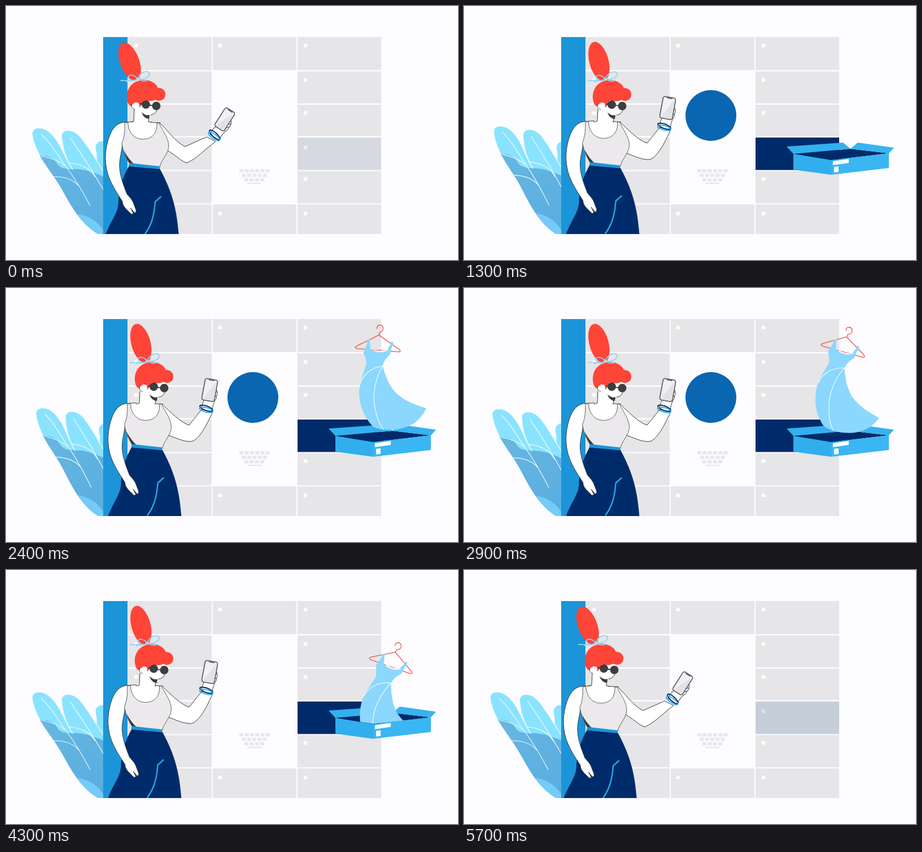
Recreate the animation shown at these times as an HTML page with a canvas. Size 800x450 px, loop 5800 ms.

```html
<!DOCTYPE html>
<html lang="en">
<head>
<meta charset="utf-8">
<title>Parcel locker</title>
<style>
html, body { margin: 0; width: 100%; height: 100%; overflow: hidden; background: #fdfcff; }
canvas { display: block; width: 800px; height: 450px; }
</style>
</head>
<body>
<canvas id="stage" width="800" height="450"></canvas>
<script>
const ctx = document.getElementById('stage').getContext('2d');
const LOOP = 5800, STEP = 100;
const PAPER = '#fdfcff', GREY = '#e6e5e7', NAVY = '#002b6b', SKY = '#27aae8',
      RED = '#ff4438', INK = '#3b3b3d', PALE = '#8bd7fe', SIDE = '#1b95d8', TINT = '#0a4f80';

const clamp = v => Math.max(0, Math.min(1, v));
const span = (t, a, b) => clamp((t - a) / (b - a));
const mix = (a, b, k) => a + (b - a) * k;
const inOut = u => u < .5 ? 4 * u ** 3 : 1 - 4 * (1 - u) ** 3;
const sine = u => (1 - Math.cos(Math.PI * u)) / 2;
const rad = d => d * Math.PI / 180;

function shape(d, fill, line, width = 1) {
  const p = d instanceof Path2D ? d : new Path2D(d);
  if (fill) { ctx.fillStyle = fill; ctx.fill(p); }
  if (line) { ctx.strokeStyle = line; ctx.lineWidth = width; ctx.stroke(p); }
}
function rect(x, y, w, h, fill) {
  ctx.fillStyle = fill;
  ctx.fillRect(x, y, w, h);
}
function oval(x, y, rx, ry, turn, fill, line, width) {
  const p = new Path2D();
  p.ellipse(x, y, rx, ry, rad(turn), 0, 7);
  shape(p, fill, line, width);
}
const dot = (x, y, r, fill) => oval(x, y, r, r, 0, fill);
function group(x, y, turn, scale, draw) {
  ctx.save();
  ctx.translate(x, y);
  ctx.rotate(rad(turn));
  ctx.scale(scale, scale);
  draw();
  ctx.restore();
}

// Plant
const leaves = [
  'M160 262C154 244 162 238 174 239L182 300L160 300Z',
  'M98 232C98 217 117 217 130 230C146 248 152 262 176 298L176 400L130 330C110 290 100 260 98 232Z',
  'M46 226C47 213 66 213 80 226C98 244 100 262 118 290C140 320 160 350 178 410L163 404C130 385 112 348 96 320C80 292 50 262 46 226Z'
].map(d => new Path2D(d));
const foliage = new Path2D();
leaves.forEach(l => foliage.addPath(l));
const darkLeaf = ctx.createLinearGradient(70, 280, 165, 380);
darkLeaf.addColorStop(0, '#66b6e0');
darkLeaf.addColorStop(1, '#5aaee0');

function plant(t) {
  const sway = Math.sin(Math.PI * span(t, 0, 3800)) ** 2;
  ctx.save();
  ctx.beginPath();
  ctx.rect(0, 0, 800, 404);
  ctx.clip();
  ctx.translate(163, 404);
  ctx.rotate(rad(2.6 * sway));
  ctx.translate(-163, -404);
  for (const l of leaves) shape(l, '#8ae3fe', PAPER, 1.2);
  ctx.clip(foliage);
  shape('M50 266C70 264 84 266 91 280C100 293 118 287 135 290C150 292 160 298 185 306L185 415L90 415Z', darkLeaf);
  shape('M112 368C140 367 165 378 178 408L106 415Z', '#74cbf5');
  shape('M62 227C82 245 91 265 106 284C122 306 136 329 149 354M62 266C84 270 96 276 104 283' +
    'M78 303C98 301 116 304 130 320M113 233C128 255 146 280 172 325M112 278C132 280 148 286 158 303' +
    'M98 226C99 244 104 268 118 290', null, '#eefaff', 1.2);
  ctx.restore();
}

// Locker wall
const COLS = [215, 366, 516], ROWS = [55, 116, 175, 233, 292.5, 351.5];
const ENDS = [113.5, 172.5, 230.5, 290.5, 349.5, 404];
const DOTS = [70, 131, 189.5, 250.5, 306.5, 367.5];

function wall(t) {
  rect(172, 55, 492, 349, PAPER);
  rect(172, 55, 43, 349, SIDE);
  const open = t < 3000 ? mix(.07, 1, span(t, 0, 250)) : Math.max(.07, (1 - span(t, 5400, 5800)) ** 1.4);
  COLS.forEach((x, c) => ROWS.forEach((y, r) => {
    if (c === 1 && r > 0 && r < 5) return;
    const h = ENDS[r] - y, w = c === 0 ? 149 : 148;
    rect(x, y, w, h, GREY);
    dot(x + (c === 1 ? 13 : c ? 14 : 15), DOTS[r], 3.5, PAPER);
    if (c === 2 && r === 3) {
      ctx.globalAlpha = open > .5 ? 1 : open;
      rect(x, y, w, h, open > .5 ? NAVY : TINT);
      ctx.globalAlpha = 1;
    }
  }));
  [[413, 289, 6], [417.5, 297, 5], [422, 305, 4]].forEach(([x, y, n]) => {
    for (let i = 0; i < n; i++) rect(x + i * 9.3, y, 7, 5.8, '#e8e7e9');
  });
  rect(427, 313, 25, 2.5, '#e8e7e9');
}

function badge(t) {
  const grow = inOut(span(t, 50, 580)), shrink = inOut(span(t, 3100, 3800));
  const r = 45 * grow * (t < 3750 ? 1 - .8 * shrink : 0);
  if (r > .5) dot(437 + 35 * shrink, 194 + 2 * shrink, r, '#0a66b0');
}

// Parcel and dress
function dress() {
  ctx.lineCap = ctx.lineJoin = 'round';
  shape('M-4 -11C-6 -17 1 -20 5 -16C9 -11 5 -6 1 -5L0 0L-37 22Q-43 26 -36 27L37 27Q43 26 37 22L0 0', null, '#ee5046', 1.3);
  shape('M-20 10L-16 9C-15 18 -13 24 -10 28C-2 31 8 31 15 28C19 22 22 15 23 9L27 12C24 20 23 27 23 32' +
    'C17 38 12 46 11 54C18 75 26 87 35 97C46 108 66 117 94 123C86 142 76 152 60 159C42 167 18 169 3 163' +
    'C-12 150 -24 132 -27 104C-28 86 -22 70 -18 53C-19 45 -22 39 -25 33C-21 25 -20 18 -20 10Z', PALE);
  shape('M-13 24Q2 32 19 25M11 54C-10 58 -24 74 -27 92M11 54C0 76 -4 105 3 128C7 146 14 158 21 166', null, '#f4fcff', 1.2);
}

function parcel(t) {
  const s = t < 3000 ? 1 - (1 - span(t, 100, 920)) ** 2 : 1 - span(t, 4750, 5500) ** 2;
  if (s <= .01) return;
  const base = draw => group(583, 262, 0, s, draw);
  base(() => {
    shape('M0 0L101 -9L169 -1L67 11Z', NAVY);
    shape('M0 0L-12 -13L88 -20L101 -9Z', '#34b0ee');
    shape('M101 -9L114 -20L178 -11L169 -1Z', '#36b3f0');
  });
  if (t > 1400 && t < 5150) {
    const swing = sine(span(t, 1950, 3500));
    const fall = inOut(span(t, 3700, 5150));
    const y = mix(302, 82, inOut(span(t, 1400, 2400))) + 7 * swing + 200 * fall;
    ctx.save();
    ctx.beginPath();
    [[-200, -262], [217, -262], [217, -8], [169, -.5], [67, 10.5], [0, .5], [-200, -8]]
      .forEach(([x, v]) => ctx.lineTo(583 + x * s, 262 + v * s));
    ctx.clip();
    group(653 + 36 * swing, y, 23 * swing - 13 * fall, 1, dress);
    ctx.restore();
  }
  base(() => {
    shape('M0 0L67 11L67 37L0 28Z', '#31aeed');
    shape('M67 11L169 -1L169 25L67 37Z', '#3ab6f2');
    shape('M70 13L98 9L98 16L70 20ZM72 23L80 22L80 32L72 33Z', '#fff');
  });
}

// Woman
function hand(tilt) {
  shape('M-14 34C-14 27 -13 23 -10 18L10 -2Q13 -3 13 3Q15 5 12 10Q13 14 9 19C6 25 5 31 4 38Z', '#fff', INK);
  shape('M13 3L9 6M12 10L8 13', null, INK);
  ctx.save();
  ctx.rotate(rad(10.5));
  const w = mix(20, 22.5, tilt), p = new Path2D();
  p.roundRect(-w / 2, -19.5, w, 38.5, 3.5);
  shape(p, '#f1f0f2', '#626268', 1.8);
  shape(`M${-w / 2 + 2} 17L${w / 2 - 2} -17L${w / 2 - 2} 17Z`, '#e2e1e5');
  shape('M-4 -18L4 -18', null, '#626268', 2);
  ctx.restore();
  oval(-6, 32, 12, 4, 20, null, NAVY, 2);
  oval(-6, 35, 12, 4, 13, null, SKY, 1.8);
}

// The arm rises (lift) a little ahead of its sideways turn (q).
function reach(p, q, lift) {
  const at = (ax, ay, bx, by) => mix(ax, bx, q).toFixed(2) + ' ' + mix(ay, by, lift).toFixed(2) + ' ';
  const x = 272 + 4.6 * p, y = 207 - p;
  shape(`M${x} ${y}C${at(286, 220, 290, 219)}${at(300, 241, 309, 238)}${at(317, 249, 324, 243)}` +
    `L${at(355, 232, 348, 213)}L${at(371, 240, 365, 221)}` +
    `C${at(352, 254, 356, 241)}${at(337, 271, 340, 273)}${at(320, 278, 326, 272)}` +
    `C${at(309, 275, 313, 272)}${at(300, 263, 302, 266)}${at(280, 253, 285, 260)}`, '#fff', INK);
  group(mix(387, 360.5, q), mix(201, 181, lift), 22 * (1 - q), 1, () => hand(q));
}

function body() {
  shape('M218 283C205 306 200 325 199 345C199 368 188 374 175 408L306 408C303 370 298 335 272 288Z', NAVY);
  shape('M246 404C256 390 262 375 264 347L274 338', null, SKY, 2.4);
  shape('M207 206L226 205L256 206L273 208L274 250L206 248Z', '#fff');
  const arm = 'C195 206 186 219 180 240C174 262 175 284 182 303C188 319 197 332 206 346' +
    'C206 353 211 358 215 362L222 369L225.5 367.5L220.5 358L227 366Q231 367 230 361L225 348' +
    'C222 341 217 337 214 333C208 318 202 302 201 286C200 270 206 256 206 243';
  shape('M214 206' + arm + 'C211 232 213 218 214 206Z', '#fff');
  shape('M226 205L210 206' + arm, null, INK);
  shape('M210 207C211 222 209 235 205 243C207 258 213 270 219 279L272 286C274 273 288 262 288 248' +
    'C288 233 276 220 271 207L267 207C268 226 258 236 242 236C226 236 216 222 216 207Z', '#ebe9ec', INK, .8);
  shape('M209 256C212 268 216 275 219 280L228 281C221 275 215 268 209 256Z', INK);
  shape('M218 278L272 284L271 289L217 284Z', SIDE);
  shape('M253 206L273 207', null, INK);
}

function head(flick, h) {
  group(231 + 3 * h, 132, mix(-20, -15, h) + flick, 1, () => oval(0, -35.5, 17, 35.5, 0, RED));
  shape('M231 164L268 164C271 176 268 186 261 191C254 195 247 193 240 189L228 184Z', '#fff');
  shape('M268 180C267 187 264 192 256 193', null, INK);
  shape('M240 188C246 194 251 194 254 193L253 200C246 199 242 195 240 188Z', INK);
  shape('M216 172C210 155 217 133 243 131C258 131 266 138 269 145C278 145 283 151 282 158' +
    'C281 167 272 170 264 166C257 170 250 168 244 167C241 172 240 176 237 179L223 178C219 177 217 175 216 172Z', RED);
  shape('M231 171C222 169 220 181 228 183L235 180L237 172Z', '#fff');
  shape('M228 172C220 171 220 182 228 183', null, INK, .8);
  shape('M236 173L248 175L266 177', null, INK, 1.8);
  dot(247.5, 174.5, 7.5, '#3e3d3f');
  dot(266, 177, 7.5, '#3e3d3f');
  group(233 + 3 * h, 129, 1.5 * flick, 1, () => {
    shape('M0 0C-9 -10 -17 -7 -16 -2C-13 4 -5 4 0 0C5 -13 18 -16 21 -10C22 -3 9 3 0 0' +
      'C-8 6 -16 2 -30 3M0 0C6 2 9 7 18 2M-13 2L-20 5', null, '#8fd2f6', 1.8);
    dot(0, 0, 2.5, '#a5dcf9');
  });
}

function woman(t) {
  const early = t < 3000;
  const p = early ? inOut(span(t, 0, 600)) : 1 - inOut(span(t, 4700, 5600));
  const q = early ? inOut(span(t, 100, 970)) : 1 - inOut(span(t, 4600, 5600));
  const h = early ? inOut(span(t, 0, 800)) : q;
  const flick = 7 * Math.sin(Math.PI * span(t, 200, 1150));
  ctx.save();
  ctx.beginPath();
  ctx.rect(0, 0, 800, 404);
  ctx.clip();
  ctx.lineCap = ctx.lineJoin = 'round';
  reach(p, q, h);
  group(4.6 * p, -1.5 * p, 0, 1, body);
  const a = 227 + 10 * h, b = 253 + 12 * h, c = 225 + 9 * h, d = 257 + 7 * h;
  shape(`M${a} 178L${a} 198L${c} 207L${d} 207L${b - 1} 205L${b} 188Z`, '#fff');
  shape(`M${a} 183L${a - 1} 204L${c - 4} 205.5M${b} 195L${b - 1} 205L${d} 206`, null, INK);
  group(14 * h, .3 * h, 0, 1, () => head(flick, h));
  ctx.restore();
}

function frame(now) {
  const t = Math.floor(now % LOOP / STEP) * STEP;
  rect(0, 0, 800, 450, PAPER);
  plant(t);
  wall(t);
  badge(t);
  parcel(t);
  woman(t);
}
const start = performance.now();
function tick() {
  frame(performance.now() - start);
  requestAnimationFrame(tick);
}
tick();
</script>
</body>
</html>
```
